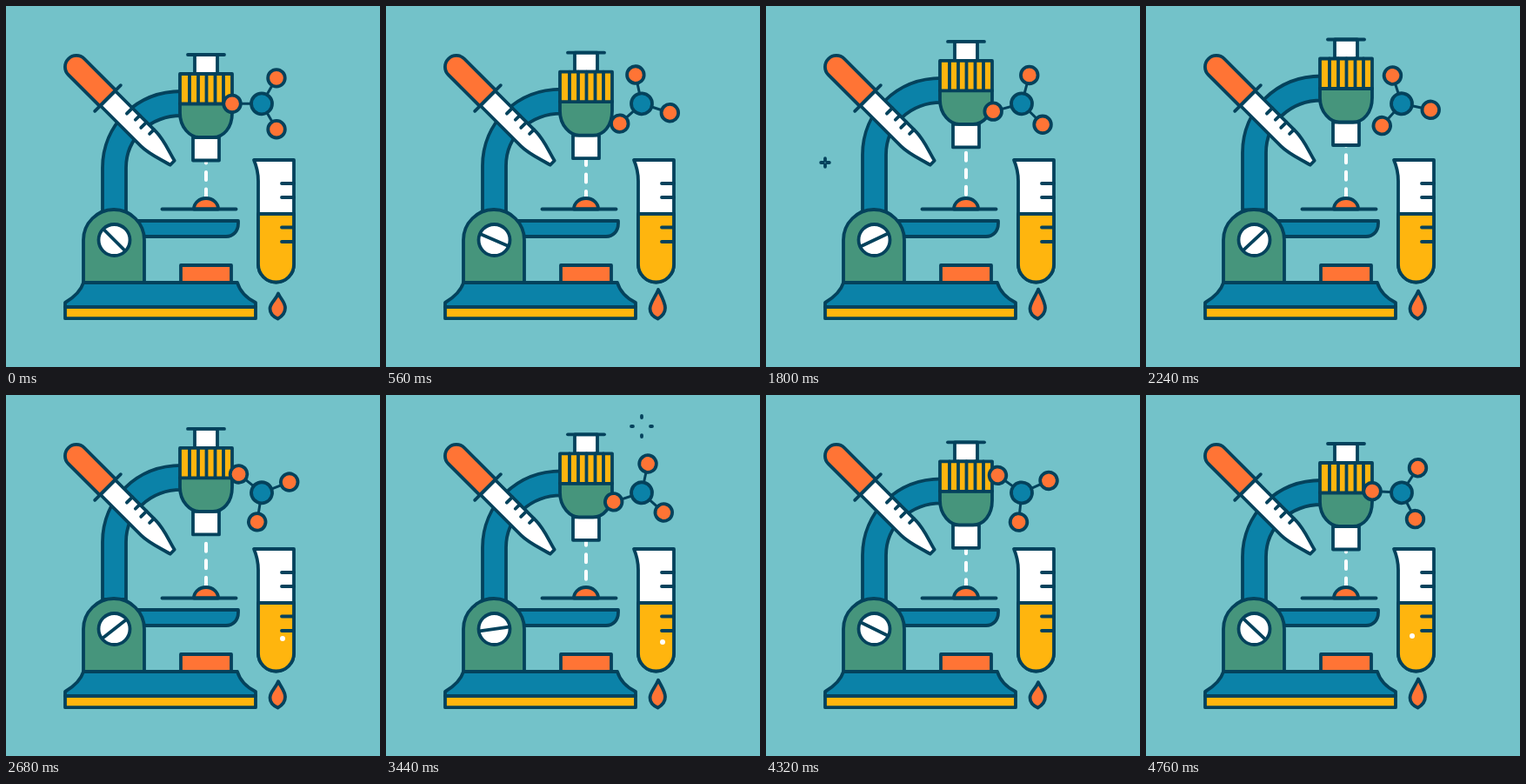
An HTML page for the animation above (4.8 s loop, 430 by 415 pixels).

```html
<!DOCTYPE html>
<html lang="en">
<head>
<meta charset="utf-8">
<title>Microscope</title>
<style>
html, body { margin: 0; width: 100%; height: 100%; overflow: hidden; background: #73c2c9; }
svg { display: block; width: 430px; height: 415px; }
.ink { stroke: #04425c; stroke-width: 3.8; stroke-linecap: round; stroke-linejoin: round; fill: none; }
.blue { fill: #0b82a8; }
.orange { fill: #ff7435; }
.green { fill: #46957c; }
.yellow { fill: #ffb50e; }
.white { fill: #fff; }
</style>
</head>
<body>
<svg viewBox="0 0 430 415">
  <g class="ink">
    <path id="arm" class="blue" d="M111 252V186C111 137 150 98 202 98V126C166 126 138 152 138 186V252Z"/>

    <path class="blue" d="M150 247H267V250C267 259 261 265 253 265H150Z"/>
    <path class="green" d="M89 318V269a35 35 0 0 1 70 0V318Z"/>
    <circle class="white" cx="124.5" cy="269" r="18"/>
    <path id="slot" d="M-17 0H17"/>
    <rect class="orange" x="201" y="298" width="58" height="20"/>
    <path class="blue" d="M68 346V341C78 335 86 328 89 318H266C269 328 277 336 287 341V346Z"/>
    <rect class="yellow" x="68" y="346" width="219" height="13.2"/>

    <path id="beam" d="M230 132.5V219" stroke="#fff" style="stroke:#fff;stroke-width:4" stroke-dasharray="9 10.5"/>
    <path class="orange" d="M216 233.5a14 12.5 0 0 1 28 0Z"/>
    <path d="M179.500 233.5H264.500"/>

    <g id="head">
      <rect class="white" x="217" y="56" width="26" height="22"/>
      <path d="M209 56H251"/>
      <rect class="white" x="215" y="151" width="30" height="26.500"/>
      <path class="green" d="M200 112V123C200 140 212 151 222 151H238C250 151 260 140 260 123V112Z"/>
      <rect class="yellow" x="200" y="78" width="60" height="34.500"/>
      <path d="M211 78v34M221 78v34M230.500 78v34M240.500 78v34M250 78v34"/>
    </g>

    <g transform="translate(117 106) rotate(45)">
      <path class="white" d="M0 -12H66C80 -12 94 -6 105 -3.500V3.500C94 6 80 12 66 12H0Z"/>
      <path class="orange" d="M0 -13H-51a13 13 0 0 0 0 26H0Z"/>
      <path d="M0 -21V21M28 -12v9M40 -12v7M51 -12v9M63 -12v7"/>
    </g>

    <g id="molecule"></g>

    <path class="white" d="M285 177H331V297a20.500 20.500 0 0 1 -41 0V201C290 190 288 184 285 177Z"/>
    <path class="yellow" d="M290 239H331V297a20.500 20.500 0 0 1 -41 0Z"/>
    <path d="M317 204H331M317 220H331M317 254.500H331M317 271H331"/>
    <g id="bubbles" class="white" stroke="none"></g>

    <path id="drop" class="orange"/>
    <path id="sparkTop"/>
    <path id="sparkLeft"/>
  </g>
</svg>
<script>
const LOOP = 4800;
const $ = id => document.getElementById(id);
const set = (el, name, value) => el.setAttribute(name, value);

function add(parent, tag, attrs) {
  const el = document.createElementNS("http://www.w3.org/2000/svg", tag);
  for (const name in attrs) set(el, name, attrs[name]);
  parent.appendChild(el);
  return el;
}

// Molecule: three bonds below, then the atoms
const atoms = [-60, 60, 180].map(deg => {
  const a = deg * Math.PI / 180;
  return { cx: 34 * Math.cos(a), cy: 34 * Math.sin(a), r: 9.8, class: "orange" };
});
const molecule = $("molecule");
for (const a of atoms) add(molecule, "path", { d: `M0 0L${a.cx} ${a.cy}`, "stroke-width": 3 });
for (const a of atoms) add(molecule, "circle", a);
add(molecule, "circle", { r: 12, class: "blue" });

const bubbles = [[318, 2480], [318, 3280], [306, 4530]].map(([x, start]) => ({
  start, el: add($("bubbles"), "circle", { cx: x })
}));

const sparks = [
  { el: $("sparkTop"), x: 294, y: 36, starts: [880, 3040] },
  { el: $("sparkLeft"), x: 68, y: 180, starts: [1704, 3709] }
];

function progress(t, start, length) {
  const p = (t - start) / length;
  return p >= 0 && p < 1 ? p : -1;
}

function drawSpark({ el, x, y, starts }, t) {
  const p = Math.max(...starts.map(s => progress(t, s, 480)));
  if (p < 0) return set(el, "d", "");
  const near = 12 * p, far = 12 * Math.min(1, 2 * p);
  set(el, "d", [[1, 0], [0, 1], [-1, 0], [0, -1]].map(([dx, dy]) =>
    `M${x + dx * near} ${y + dy * near}L${x + dx * far} ${y + dy * far}`).join(""));
}

function drawDrop(t) {
  const p = (t % 604) / 604;
  const tip = 330.5 - 5 * Math.pow(p, 1.6);
  set($("drop"), "d", `M313 ${tip}C317 ${tip + 8} 321 341 321 347` +
    "C321 354 317 357 312.500 359.500C307 357 303.500 353 303.500 348" +
    `C303.500 341 310 ${tip + 8} 313 ${tip}Z`);
}

function drawBubble({ el, start }, t) {
  const p = progress(t, start, 600);
  set(el, "r", p < 0 ? 0 : 3 * Math.min(1, p * 8, (1 - p) * 8));
  set(el, "cy", 300 - 60 * p);
}

function draw(t) {
  const turn = t / LOOP;
  const lift = (1 - Math.cos(turn * 2 * Math.PI)) / 2;
  const swing = 1 - Math.abs(1 - 2 * turn);
  const shift = `translate(0 ${-17.7 * lift})`;
  set($("arm"), "transform", shift);
  set($("head"), "transform", shift);
  set($("slot"), "transform", `translate(124.5 269) rotate(${45 - 94 * swing})`);
  set($("beam"), "stroke-dashoffset", -19.5 * lift);
  set(molecule, "transform", `translate(294 112.3) rotate(${-360 * turn})`);
  drawDrop(t);
  bubbles.forEach(b => drawBubble(b, t));
  sparks.forEach(s => drawSpark(s, t));
}

const begin = performance.now();
function tick() {
  draw((performance.now() - begin) % LOOP);
  requestAnimationFrame(tick);
}
tick();
</script>
</body>
</html>
```
